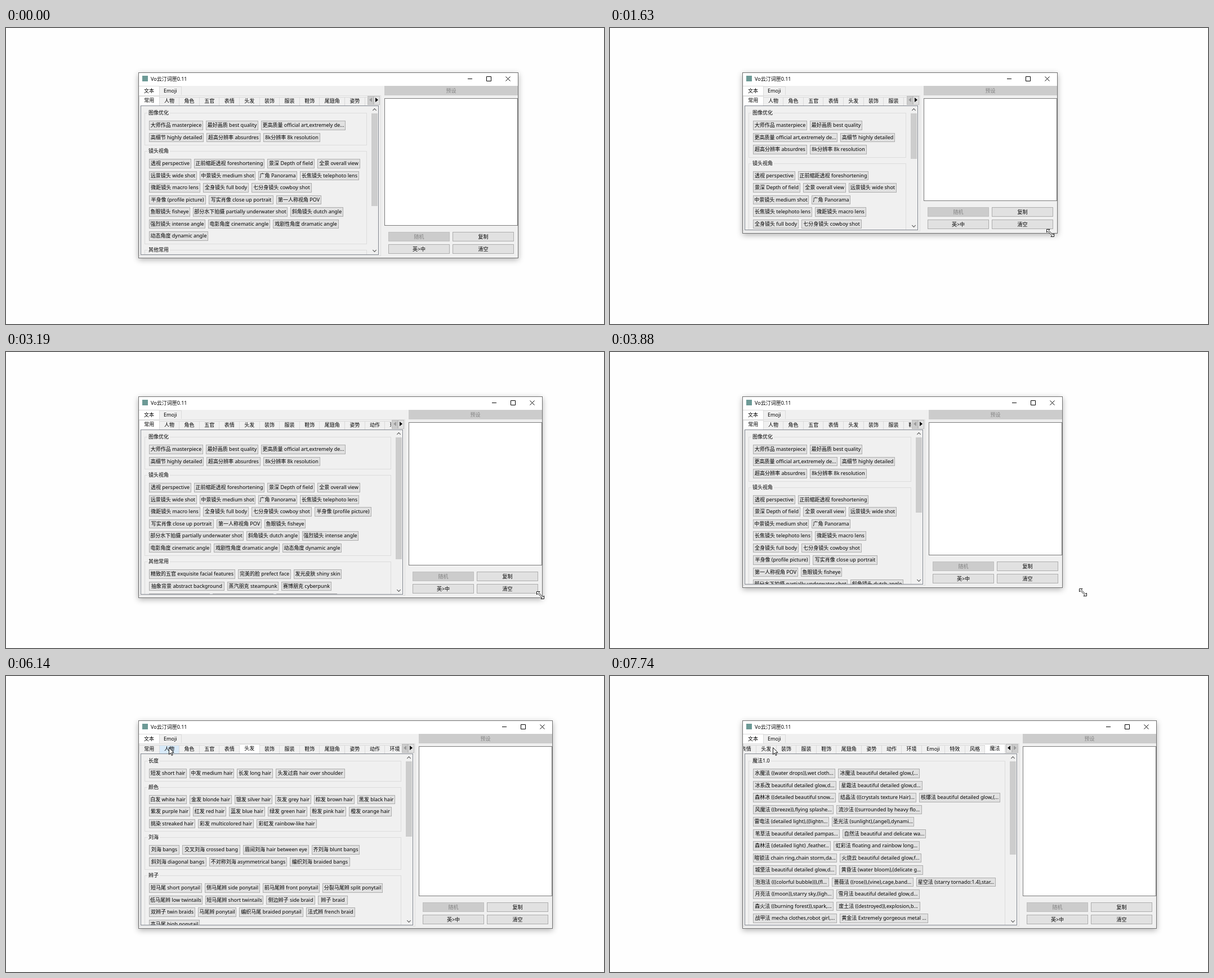
An HTML page for the animation above (8 s loop, 1062 by 527 pixels).

```html
<!DOCTYPE html>
<html lang="zh-CN">
<head>
<meta charset="utf-8">
<title>词匣</title>
<style>
html, body { margin: 0; width: 100%; height: 100%; overflow: hidden; background: #fefefe; }
body { position: relative; font: 9px/12px "Noto Sans", "Noto Sans CJK SC", "Noto Sans CJK JP", "Noto Sans CJK", "DejaVu Sans", sans-serif; color: #000; }
* { box-sizing: border-box; }
#win, #win .abs, #cursor { position: absolute; }
#win { left: 235px; top: 79px; border: 1px solid #707070; background: #f0f0f0; box-shadow: 0 3px 10px rgba(0,0,0,.3); white-space: nowrap; }
#bar { left: 0; right: 0; top: 0; height: 23px; background: #fff; }
#icon { left: 6px; top: 5px; width: 10px; height: 10px; background: #6d9a96; }
#name { left: 21px; top: 5px; }
#controls { right: 0; top: 0; width: 100px; height: 22px; fill: none; stroke: #000; }
.tab { flex: none; height: 15px; margin-top: 2px; padding: 0 8.3px; line-height: 11px; border: solid #dadada; border-width: 1px 1px 0 0; background: #f0f0f0; }
.tab.on { height: 17px; margin-top: 0; line-height: 14px; background: #fff; }
.tab.hover { background: #d8eaf9; }
#kinds { left: 0; top: 23px; display: flex; }
#kinds .tab { margin-top: 1px; padding: 0 7px; line-height: 14px; }
#kinds .on { height: 17px; margin-top: 0; padding: 0 9px; line-height: 15px; }
#pane { left: 0; top: 40px; right: 243px; bottom: 3px; border: 1px solid #dedede; }
#strip { left: 1px; top: 41px; right: 268px; height: 17px; overflow: hidden; }
#tabs { display: flex; width: max-content; position: relative; }
.step { top: 41px; width: 11px; height: 16px; border: 1px solid #bdbdbd; background: #e1e1e1; }
.step::after { content: ""; position: absolute; left: 2px; top: 2px; border: 4px solid transparent; border-left: 5px solid #000; border-right: 0; }
#prev { right: 256px; transform: scaleX(-1); }
#next { right: 245px; }
.step.off { background: #ccc; }
.step.off::after { border-left-color: #9a9a9a; }
#panel { left: 3px; top: 58px; right: 247px; bottom: 5px; border: 1px solid #828790; overflow: hidden; }
.page { position: absolute; left: 6px; right: 20px; top: 12px; padding-bottom: 9px; display: none; }
.page.on { display: block; }
.wide .page { right: 7px; }
.group { position: relative; display: flex; flex-wrap: wrap; gap: 5px; margin-bottom: 10px; padding: 13px 8px 5px 7px; border: 1px solid #dcdcdc; }
.group b { position: absolute; left: 4px; top: -7px; padding: 0 2px; font-weight: normal; background: #f0f0f0; }
.btn { flex: none; display: flex; align-items: center; justify-content: center; min-width: 53px; height: 16.5px; padding: 0 1px; border: 1px solid #adadad; background: #e1e1e1; white-space: pre; }
#scroll { right: 0; top: 0; bottom: 0; width: 12px; }
.wide #scroll { display: none; }
#thumb { left: 0; top: 13px; width: 11px; background: #cdcdcd; }
.chev { left: 3px; width: 5px; height: 5px; border: solid #505050; border-width: 1.5px 0 0 1.5px; }
#preset { right: 0; top: 23px; width: 237px; height: 17px; min-width: 0; border: 0; }
.off.btn { background: #ccc; border-color: #bfbfbf; color: #838383; }
#edit { right: 0; top: 45px; bottom: 57px; width: 237px; border: 1px solid #7a7a7a; background: #fff; }
#win .act { width: 109px; height: 17px; }
.l { right: 121px; } .r { right: 7px; } .u { bottom: 29px; } .d { bottom: 7px; }
#cursor { left: 0; top: 0; width: 1px; height: 1px; overflow: visible; fill: #fff; stroke: #000; stroke-width: .9; }
</style>
</head>
<body>
<div id="win">
  <div id="bar" class="abs">
    <div id="icon" class="abs"></div>
    <div id="name" class="abs">Vo云汀词匣0.11</div>
    <svg id="controls" class="abs" viewBox="0 0 100 22"><path d="M11 10.500h8M44.500 6.500h8v8h-8zM78.500 6.500l8 8m0-8l-8 8"/></svg>
  </div>
  <div id="kinds" class="abs"><div class="tab on">文本</div><div class="tab">Emoji</div></div>
  <div id="pane" class="abs"></div>
  <div id="strip" class="abs"><div id="tabs"></div></div>
  <div id="prev" class="abs step"></div><div id="next" class="abs step"></div>
  <div id="panel" class="abs">
    <div id="scroll" class="abs">
      <div class="abs chev" style="top:5px;transform:rotate(45deg)"></div>
      <div id="thumb" class="abs"></div>
      <div class="abs chev" style="bottom:5px;transform:rotate(225deg)"></div>
    </div>
  </div>
  <div id="preset" class="abs btn off">预设</div>
  <div id="edit" class="abs"></div>
  <div class="abs btn act off l u">随机</div><div class="abs btn act r u">复制</div>
  <div class="abs btn act l d">英&gt;中</div><div class="abs btn act r d">清空</div>
</div>
<svg id="cursor">
  <path id="arrow" d="M.5.5V12.800L3.300 10.100 5.300 14.500 7.100 13.700 5.200 9.400H9Z"/>
  <path id="sizer" d="M-6.500-6.500H-1L-3-4.500 4.500 3 6.500 1V6.500H1L3 4.500-4.500-3-6.500-1Z"/>
</svg>
<script>
// "#tab extra-height", then "group|label~width;label~width"
const book = `#常用 4
图像优化|大师作品 masterpiece~96;最好画质 best quality~93;更高质量 official art,extremely de...~150;高细节 highly detailed~97;超高分辨率 absurdres~96;8k分辨率 8k resolution~101
镜头视角|透视 perspective~75;正前缩距透视 foreshortening~125;景深 Depth of field~84;全景 overall view~76;远景镜头 wide shot~85;中景镜头 medium shot~99;广角 Panorama~69;长焦镜头 telephoto lens~105;微距镜头 macro lens~91;全身镜头 full body~81;七分身镜头 cowboy shot~107;半身像 (profile picture)~101;写实肖像 close up portrait~115;第一人称视角 POV~80;鱼眼镜头 fisheye~73;部分水下拍摄 partially underwater shot~168;斜角镜头 dutch angle~94;强烈镜头 intense angle~100;电影角度 cinematic angle~110;戏剧性角度 dramatic angle~117;动态角度 dynamic angle~105
其他常用|精致的五官 exquisite facial features~153;完美的脸 prefect face~94;发光皮肤 shiny skin~85;抽象背景 abstract background~134;蒸汽朋克 steampunk~91;赛博朋克 cyberpunk~89;奇幻风格 fantasy theme~108;柔和光线 soft lighting~108;光线追踪 ray tracing~108;电影光效 cinematic light~108;丰富色彩 vivid colors~108;简单背景 plain backdrop~110
#人物 90
人数|一个女孩 1girl;两个女孩 2girls;一个男孩 1boy;多个女孩 multiple girls;单人 solo
年龄|幼年 child;少年 teenager;成年 mature;老年 old
身材|苗条 slender;高挑 tall;娇小 petite;健壮 muscular;丰满 curvy;纤细的腰 slim waist
皮肤|白皙皮肤 fair skin;深色皮肤 dark skin;晒痕 tan lines;雀斑 freckles;闪亮皮肤 shiny skin
关系|姐妹 sisters;双胞胎 twins;情侣 couple;朋友 friends;母女 mother and daughter
其他|纹身 tattoo;疤痕 scar;绷带 bandage;汗水 sweat;湿身 wet
#角色 120
职业|女仆 maid;护士 nurse;教师 teacher;警察 police;骑士 knight;忍者 ninja;巫女 miko;修女 nun
幻想|女巫 witch;精灵 elf;天使 angel;恶魔 demon;吸血鬼 vampire;美人鱼 mermaid;魔法少女 magical girl
兽耳|猫娘 cat girl;狐娘 fox girl;狼娘 wolf girl;兔娘 bunny girl;龙娘 dragon girl
其他|公主 princess;女王 queen;偶像 idol;海盗 pirate;机器人 robot;机械少女 mecha musume
场合|学生 student;舞者 dancer;歌手 singer;新娘 bride;战士 warrior
#五官 150
眼睛|蓝眼 blue eyes;红眼 red eyes;金眼 golden eyes;绿眼 green eyes;紫眼 purple eyes;异色瞳 heterochromia;发光的眼睛 glowing eyes;闭眼 closed eyes
瞳孔|竖瞳 slit pupils;心形瞳 heart-shaped pupils;星形瞳 star-shaped pupils;空洞 empty eyes
耳朵|尖耳 pointy ears;猫耳 cat ears;狐耳 fox ears;兔耳 rabbit ears;狗耳 dog ears
嘴巴|张嘴 open mouth;闭嘴 closed mouth;虎牙 fang;尖牙 sharp teeth;舌头 tongue;口红 lipstick
眉毛|粗眉 thick eyebrows;短眉 short eyebrows;睫毛 long eyelashes;眼影 eyeshadow
#表情 80
开心|微笑 smile;大笑 laughing;露齿笑 grin;轻笑 light smile;得意 smug;兴奋 excited
悲伤|难过 sad;哭泣 crying;流泪 tears;失望 disappointed;沮丧 depressed
生气|愤怒 angry;皱眉 frown;撅嘴 pout;厌恶 disgust;瞪眼 glaring
害羞|脸红 blush;尴尬 embarrassed;害羞 shy;紧张 nervous
其他|面无表情 expressionless;困倦 sleepy;惊讶 surprised;困惑 confused;严肃 serious;无聊 bored
#头发 297
长度|短发 short hair~67;中发 medium hair~79;长发 long hair~64;头发过肩 hair over shoulder~123
颜色|白发 white hair~67;金发 blonde hair~75;银发 silver hair~67;灰发 grey hair~64;棕发 brown hair~72;黑发 black hair~67;紫发 purple hair~73;红发 red hair~59;蓝发 blue hair~64;绿发 green hair~70;粉发 pink hair~64;橙发 orange hair~76;挑染 streaked hair~82;彩发 multicolored hair~99;彩虹发 rainbow-like hair~107
刘海|刘海 bangs~54;交叉刘海 crossed bang~103;眉间刘海 hair between eye~117;齐刘海 blunt bangs~85;斜刘海 diagonal bangs~102;不对称刘海 asymmetrical bangs~138;编织刘海 braided bangs~107
辫子|短马尾 short ponytail~94;侧马尾辫 side ponytail~98;前马尾辫 front ponytail~101;分裂马尾辫 split ponytail~107;低马尾辫 low twintails~95;短马尾辫 short twintails~103;侧边辫子 side braid~87;辫子 braid~53;双辫子 twin braids~82;马尾辫 ponytail~68;编织马尾 braided ponytail~114;法式辫 french braid~87;高马尾 high ponytail~90
#装饰 110
头饰|发带 hairband;发夹 hairclip;蝴蝶结 hair bow;皇冠 crown;花环 head wreath;头纱 veil;发簪 hair stick
帽子|贝雷帽 beret;草帽 straw hat;女巫帽 witch hat;棒球帽 baseball cap;兜帽 hood
首饰|耳环 earrings;项链 necklace;戒指 ring;手镯 bracelet;项圈 choker;胸针 brooch
眼镜|眼镜 glasses;墨镜 sunglasses;单片眼镜 monocle;护目镜 goggles;眼罩 eyepatch
其他|领带 necktie;围巾 scarf;手套 gloves;面具 mask;口罩 mouth mask
#服装 200
上衣|衬衫 shirt;毛衣 sweater;夹克 jacket;风衣 trench coat;卫衣 hoodie;背心 vest;斗篷 cape;披风 cloak
裙子|连衣裙 dress;百褶裙 pleated skirt;短裙 miniskirt;长裙 long skirt;晚礼服 evening gown;婚纱 wedding dress
制服|校服 school uniform;水手服 serafuku;军装 military uniform;女仆装 maid outfit;西装 business suit
传统|和服 kimono;浴衣 yukata;旗袍 china dress;汉服 hanfu;巫女服 miko clothes
裤子|短裤 shorts;牛仔裤 jeans;工装裤 cargo pants;运动裤 track pants
#鞋饰 60
袜子|白袜 white socks;黑袜 black socks;过膝袜 thighhighs;短袜 ankle socks;条纹袜 striped socks;网袜 fishnets
鞋子|靴子 boots;高跟鞋 high heels;凉鞋 sandals;运动鞋 sneakers;乐福鞋 loafers;拖鞋 slippers;长靴 thigh boots
腿饰|腿环 thigh strap;脚链 anklet;绑腿 leg wrap;丝带 leg ribbon;护膝 knee pads
其他|赤脚 barefoot;木屐 geta;溜冰鞋 skates;雪地靴 snow boots;雨靴 rain boots
材质|皮革 leather;蕾丝 lace;透明 see-through
#尾翅角 70
尾巴|猫尾 cat tail;狐尾 fox tail;狼尾 wolf tail;龙尾 dragon tail;恶魔尾 demon tail;多条尾巴 multiple tails
翅膀|天使翅膀 angel wings;恶魔翅膀 demon wings;蝴蝶翅膀 butterfly wings;妖精翅膀 fairy wings;黑色翅膀 black wings
角|恶魔角 demon horns;龙角 dragon horns;鹿角 antlers;羊角 sheep horns;独角 single horn
光环|光环 halo;破碎光环 broken halo;发光光环 glowing halo
其他|羽毛 feathers;鳞片 scales;爪子 claws;触角 antennae
#姿势 100
站|站立 standing;单腿站立 standing on one leg;倚靠 leaning;前倾 leaning forward
坐|坐着 sitting;鸭子坐 wariza;盘腿 crossed legs;抱膝 hugging own legs;跪坐 seiza
躺|躺着 lying;仰卧 on back;俯卧 on stomach;侧卧 on side;蜷缩 fetal position
手|双手合十 own hands together;叉腰 hands on hips;抱臂 crossed arms;举手 arms up;伸手 outstretched arms
其他|跪着 kneeling;蹲着 squatting;回头 looking back;歪头 head tilt;背对 from behind
#动作 130
动态|跑步 running;跳跃 jumping;行走 walking;飞行 flying;漂浮 floating;坠落 falling;跳舞 dancing
手部|挥手 waving;拿着剑 holding sword;拿着书 holding book;撑伞 holding umbrella;敬礼 salute;祈祷 praying
日常|吃东西 eating;喝水 drinking;睡觉 sleeping;阅读 reading;写字 writing;烹饪 cooking
互动|拥抱 hug;牵手 holding hands;亲吻 kiss;摸头 headpat;公主抱 princess carry
其他|战斗 fighting;施法 casting spell;唱歌 singing;游泳 swimming
#环境 160
天空|蓝天 blue sky;星空 starry sky;夜空 night sky;日落 sunset;日出 sunrise;云 clouds;彩虹 rainbow;满月 full moon
自然|森林 forest;海洋 ocean;沙滩 beach;山 mountain;河流 river;湖泊 lake;瀑布 waterfall;花田 flower field
城市|街道 street;城市 city;屋顶 rooftop;咖啡馆 cafe;图书馆 library;教室 classroom;车站 train station
季节|春天 spring;夏天 summer;秋天 autumn;冬天 winter;雪 snow;雨 rain
室内|卧室 bedroom;厨房 kitchen;浴室 bathroom;窗边 by window
#Emoji
天气|太阳 ☀;云 ☁;雨 ☂;雪 ☃;星 ★
符号|爱心 ♥;音符 ♪;花 ✿;闪光 ✦;剑 ⚔;和平 ☮;笑脸 ☺
#特效
光效|体积光 volumetric light;逆光 backlight;镜头光晕 lens flare;辉光 glow;丁达尔光 god rays
画面|动态模糊 motion blur;色差 chromatic aberration;粒子 particles;景深 bokeh;火花 sparks
#风格 90
画风|水彩 watercolor;油画 oil painting;素描 sketch;水墨 ink wash;像素 pixel art;厚涂 impasto;平涂 flat color
时代|古典 classical;巴洛克 baroque;哥特 gothic;复古 retro;未来 futuristic
媒介|漫画 comic;插画 illustration;壁纸 wallpaper;海报 poster;线稿 lineart;单色 monochrome
渲染|三维 3d render;写实 realistic;卡通 cartoon;低多边形 low poly;赛璐璐 cel shading
其他|极简 minimalism;超现实 surreal;印象派 impressionism;波普 pop art
#魔法 184
魔法1.0|水魔法 ((water drops)),wet cloth...~146;冰魔法 beautiful detailed glow,(...~145;冰系改 beautiful detailed glow,d...~148;星霜法 beautiful detailed glow,d...~148;森林冰 ((detailed beautiful snow...~147;结晶法 (((crystals texture Hair)...~138;核爆法 beautiful detailed glow,(...~144;风魔法 ((breeze)),flying splashe...~143;流沙法 ((surrounded by heavy flo...~152;雷电法 (detailed light),((lightn...~135;圣光法 (sunlight),(angel),dynami...~146;苇草法 beautiful detailed pampas...~154;自然法 beautiful and delicate wa...~148;森林法 (detailed light) ,feather...~138;虹彩法 floating and rainbow long...~153;暗锁法 chain ring,chain storm,da...~149;火烧云 beautiful detailed glow,f...~145;城堡法 beautiful detailed glow,d...~148;黄昏法 (water bloom),(delicate g...~149;泡泡法 (((colorful bubble))),(fl...~135;薔薇法 ((rose)),(vine),cage,band...~145;星空法 (starry tornado:1.4),star...~141;月亮法 ((moon)),starry sky,(ligh...~143;雪月法 beautiful detailed glow,d...~148;森火法 ((burning forest)),spark,...~143;废土法 ((destroyed)),explosion,b...~149;战甲法 mecha clothes,robot girl,...~149;黄金法 Extremely gorgeous metal ...~157`;

const $ = id => document.getElementById(id);
const add = (parent, cls, text = '', tag = 'div') => {
  const el = document.createElement(tag);
  el.className = cls;
  el.textContent = text;
  return parent.appendChild(el);
};

const tabs = [], pages = [];
for (const part of book.slice(1).split('\n#')) {
  const [head, ...groups] = part.split('\n');
  const [label, extra = 0] = head.split(' ');
  tabs.push(add($('tabs'), 'tab', label));
  const page = add($('panel'), 'page');
  pages.push(page);
  for (const line of groups) {
    const [title, items] = line.split('|');
    const group = add(page, 'group');
    add(group, '', title, 'b');
    for (const item of items.split(';')) {
      const [text, width] = item.split('~');
      const btn = add(group, 'btn', text);
      if (width) btn.style.width = width + 'px';
    }
  }
  page.lastChild.style.paddingBottom = 5 + +extra + 'px';
}

// pointer path: time, x, y
const path = [
  [0, 690, -40], [30, 700, -6], [420, 800, 215], [820, 908, 409], [1090, 909, 409],
  [1340, 858, 384], [1540, 794, 365], [1630, 782, 365], [1850, 762, 385], [2150, 766, 438],
  [2430, 825, 451], [2520, 857, 453], [2700, 901, 451], [2950, 945, 442], [3100, 952, 437],
  [3190, 949, 433], [3570, 768, 372], [3790, 803, 419], [3880, 840, 428], [4180, 955, 447],
  [4340, 970, 449], [4400, 970, 449], [4840, 300, 106], [5140, 300, 106], [5420, 289, 127], [8000, 289, 127]
];
const flips = [5730, 5900, 5980, 6060, 6140, 6310, 6410, 6580, 6680, 6780, 6880, 7020, 7060, 7400, 7640, 7740];
const LAG = 90;

const rate = (i, k) => (path[i + 1][k] - path[i][k]) / (path[i + 1][0] - path[i][0]);
function slope(i, k) {
  if (i < 1 || i > path.length - 2) return 0;
  const a = rate(i - 1, k), b = rate(i, k);
  return a * b > 0 ? 2 * a * b / (a + b) : 0;
}
function pointer(t) {
  let i = 0;
  while (i < path.length - 2 && t >= path[i + 1][0]) i++;
  const h = path[i + 1][0] - path[i][0], u = (t - path[i][0]) / h, v = 1 - u;
  return [1, 2].map(k => Math.round(
    path[i][k] * v * v * (1 + 2 * u) + path[i + 1][k] * u * u * (3 - 2 * u) +
    h * u * v * (slope(i, k) * v - slope(i + 1, k) * u)));
}

function draw(t) {
  const [right, bottom] = pointer(Math.min(Math.max(t - LAG, 1030), 4350));
  $('win').style.width = right - 234 + 'px';
  $('win').style.height = bottom - 78 + 'px';

  const active = flips.filter(f => t >= f).length;
  tabs.forEach((tab, i) => tab.classList.toggle('on', i === active));
  pages.forEach((page, i) => page.classList.toggle('on', i === active));
  const tab = tabs[active];
  const shift = Math.max(0, tab.offsetLeft + tab.offsetWidth - $('strip').clientWidth);
  $('tabs').style.left = -shift + 'px';
  tabs[1].classList.toggle('hover', t > 5400 && active !== 1 && !shift);
  $('prev').classList.toggle('off', !shift);
  $('next').classList.toggle('off', active === tabs.length - 1);

  $('panel').classList.remove('wide');
  const view = $('panel').clientHeight, full = pages[active].offsetHeight + 12;
  $('panel').classList.toggle('wide', full <= view);
  $('thumb').style.height = Math.round((view - 26) * Math.min(1, view / full)) + 'px';

  const sizing = t >= 850 && t < 4400;
  $('arrow').style.display = sizing ? 'none' : '';
  $('sizer').style.display = sizing ? '' : 'none';
  $('cursor').style.transform = `translate(${pointer(t).join('px,')}px)`;
}

const start = performance.now();
(function tick() {
  draw((performance.now() - start) % 8000);
  requestAnimationFrame(tick);
})();
</script>
</body>
</html>
```
